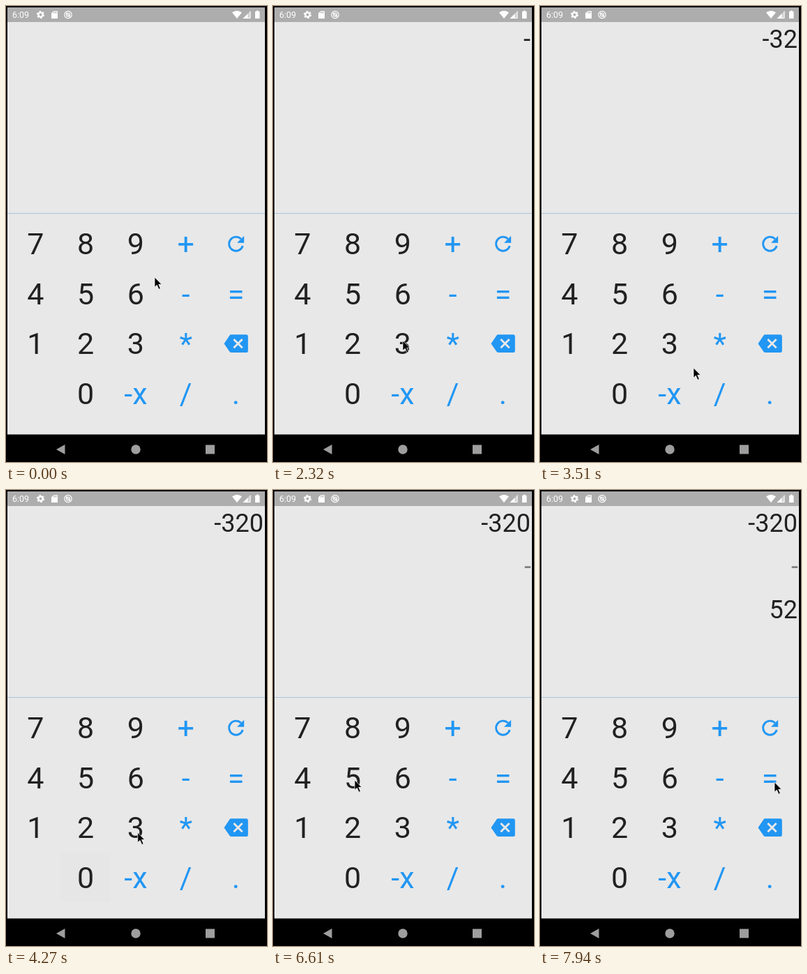
An HTML page for the animation above (8000 ms loop, 374x654 px).

```html
<!DOCTYPE html>
<html lang="en">
<head>
<meta charset="utf-8">
<title>Calculator</title>
<style>
  html, body { margin: 0; width: 100%; height: 100%; overflow: hidden; background: #000; }
  svg { display: block; width: 374px; height: 654px; }
  text { font-family: Roboto, "Liberation Sans", sans-serif; }
  #keys text { font-size: 43px; text-anchor: middle; fill: #212121; }
  #keys .op { fill: #2196f3; }
  #display text { font-size: 36px; text-anchor: end; fill: #212121; }
  #display .sign { fill: #808080; }
</style>
</head>
<body>
<svg viewBox="0 0 374 654">
  <rect width="374" height="654"/>
  <rect x="2" y="2" width="369" height="612.5" fill="#e8e8e8"/>

  <!-- status bar -->
  <rect x="2" y="2" width="369" height="21" fill="#adadad"/>
  <g fill="#fff">
    <text x="9" y="17" font-size="12.5">6:09</text>
    <g fill="none" stroke="#fff" stroke-width="1.2">
      <circle cx="49.5" cy="12.5" r="3.1" stroke-width="2.4"/>
      <circle cx="49.5" cy="12.5" r="4.7" stroke-width="1.8" stroke-dasharray="2.5 2.42"/>
      <circle cx="89" cy="12.5" r="5.2"/>
      <circle cx="89" cy="12.5" r="2.5"/>
      <path d="M86 9.5l6 6"/>
    </g>
    <path d="M68.3 7.3H74V18H65V10.5Z"/>
    <path d="M68.7 8.3v2.2m1.8-2.2v2.2m1.8-2.2v2.2" stroke="#adadad"/>
    <path d="M324 9.3Q331 4.3 338 9.3L331 18Z"/>
    <path d="M350.5 7V18H339.5Z" fill-opacity=".45"/>
    <path d="M346.5 11V18H339.5Z"/>
    <path d="M340 17.5H350V7.5" fill="none" stroke="#fff"/>
    <path d="M359 6.5h2.5v1.2h2v10.3h-6.5v-10.3h2z"/>
  </g>

  <rect x="2" y="297" width="369" height="1" fill="#a9c3dc"/>
  <rect id="glow" width="72" height="72" rx="2" opacity="0"/>
  <g id="keys"></g>

  <!-- refresh and backspace -->
  <g transform="translate(312.5 324) scale(1.43)">
    <path d="M16.95 7.05A7 7 0 1 0 18.7 14" fill="none" stroke="#2196f3" stroke-width="2"/>
    <path d="M20 4V11H13Z" fill="#2196f3"/>
  </g>
  <g transform="translate(312.5 467) scale(1.43)">
    <path d="M7 3H22Q24 3 24 5V19Q24 21 22 21H7Q6 21 5.400 20L0 12L5.400 4Q6 3 7 3Z" fill="#2196f3"/>
    <path d="M9.700 7.700l8.600 8.600m0-8.600l-8.600 8.600" stroke="#e8e8e8" stroke-width="2"/>
  </g>

  <g id="display">
    <text x="369" y="60"></text>
    <text x="370" y="122" class="sign"></text>
    <text x="369" y="184"></text>
  </g>

  <!-- navigation bar -->
  <g fill="#9e9e9e">
    <path d="M72 636L84.500 629V643Z"/>
    <circle cx="186" cy="636" r="6.700"/>
    <rect x="286" y="629.500" width="13" height="13"/>
  </g>

  <path id="cursor" d="M0 0V14.200L3.300 11.200L6 17.200L8.300 16.200L5.700 10.300H10Z" stroke="#fff" stroke-width=".7"/>
</svg>
<script>
const LOOP = 8000, PITCH_X = 71.8, PITCH_Y = 71.6, TAP = 120;
const $ = id => document.getElementById(id);
const cells = {};

// Blank cells hold icons or nothing.
["7 8 9 +", "4 5 6 - =", "1 2 3 *", "_ 0 -x / ."].forEach((line, row) =>
  line.split(" ").forEach((label, col) => {
    if (label === "_") return;
    const cell = cells[label] = { x: 42.3 + PITCH_X * col, y: 340.5 + PITCH_Y * row };
    const key = document.createElementNS("http://www.w3.org/2000/svg", "text");
    key.textContent = label;
    key.setAttribute("x", cell.x);
    key.setAttribute("y", cell.y + 15.5);
    if (!/^\d$/.test(label)) key.setAttribute("class", "op");
    $("keys").append(key);
  }));

// Where the pointer goes: arrival, rest, place and the key it taps there
const stop = (at, rest, x, y, key) => ({ at, rest, x, y, key });
const stops = [
  stop(0, 800, 213, 389),
  stop(1060, 160, 273, 441),
  stop(1620, 0, 211, 549),
  stop(1840, 180, 180, 555, "-x"),
  stop(2320, 180, 186, 480, "3"),
  stop(2720, 150, 107, 482, "2"),
  stop(3090, 170, 107, 538),
  stop(3510, 0, 220, 519),
  stop(3880, 200, 112, 558, "0"),
  stop(4520, 0, 303, 392),
  stop(4880, 520, 256, 413, "-"),
  stop(5900, 700, 117, 416),
  stop(6700, 200, 119, 417, "5"),
  stop(7100, 120, 105, 487, "2"),
  stop(7600, 0, 347, 491),
  stop(7940, 60, 336, 419)
];
const path = stops.flatMap(({ at, rest, x, y }) =>
  rest ? [{ t: at, x, y }, { t: at + rest, x, y }] : [{ t: at, x, y }]);

const clamp = v => Math.max(0, Math.min(1, v));

const slope = (i, axis) => path[i] && path[i + 1]
  ? (path[i + 1][axis] - path[i][axis]) / (path[i + 1].t - path[i].t) : 0;

// Zero at turns and rests, harmonic mean elsewhere
function tangent(i, axis) {
  const a = slope(i - 1, axis), b = slope(i, axis);
  return a * b > 0 ? 2 * a * b / (a + b) : 0;
}

function pointer(t, axis) {
  const i = path.findIndex((p, n) => t < path[n + 1].t);
  const p = path[i], q = path[i + 1];
  const d = q.t - p.t, u = (t - p.t) / d, v = 1 - u;
  return p[axis] * v * v * (1 + 2 * u) + q[axis] * u * u * (3 - 2 * u)
    + d * u * v * (tangent(i, axis) * v - tangent(i + 1, axis) * u);
}

// First number, operator, second number
function readout(t) {
  const lines = ["", "", ""];
  for (const { at, key } of stops) {
    if (!key || t < at + TAP) continue;
    if (key === "-") lines[1] = key;
    else lines[lines[1] ? 2 : 0] += key.replace("x", "");
  }
  return lines;
}

function drawGlow(t) {
  const tap = stops.filter(s => s.key && s.at <= t).pop();
  const age = tap ? t - tap.at : LOOP;
  $("glow").setAttribute("opacity", 0.06 * clamp(age / 80) * clamp((TAP + 300 - age) / 200));
  if (!tap) return;
  $("glow").setAttribute("x", cells[tap.key].x - 36);
  $("glow").setAttribute("y", cells[tap.key].y - 36);
}

function draw(t) {
  drawGlow(t);
  readout(t).forEach((s, i) => { $("display").children[i].textContent = s; });
  $("cursor").setAttribute("transform", `translate(${pointer(t, "x")} ${pointer(t, "y")})`);
}

function tick() {
  draw(performance.now() % LOOP);
  requestAnimationFrame(tick);
}
tick();
</script>
</body>
</html>
```
